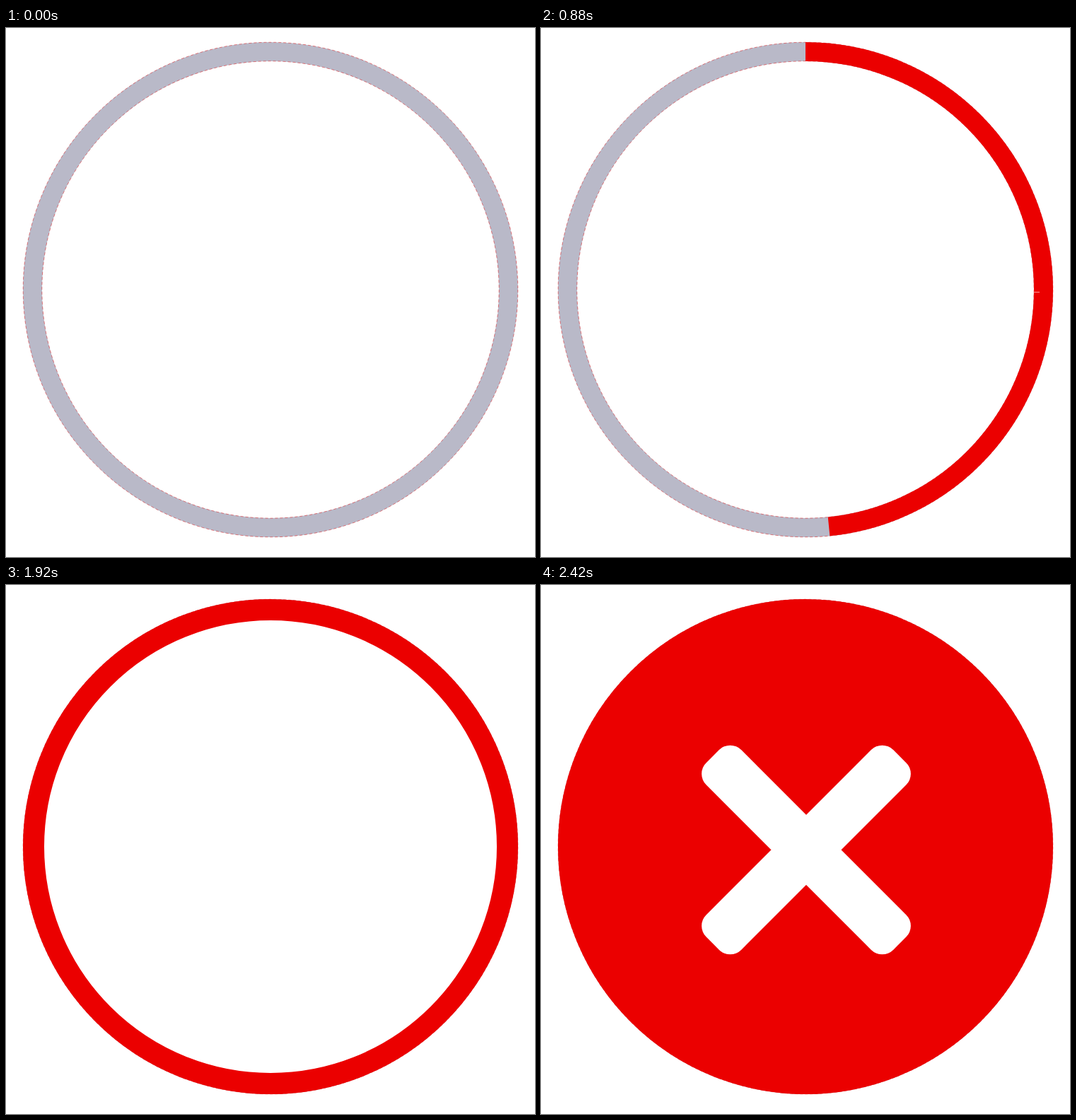
An HTML page for the animation above (2440 ms loop, 748x748 px).

```html
<!DOCTYPE html>
<html lang="en">
<head>
<meta charset="utf-8">
<title>Error ring</title>
<style>
  html, body { margin: 0; width: 100%; height: 100%; overflow: hidden; background: #fff; }
  svg { display: block; width: 100vw; height: 100vh; }
</style>
</head>
<body>
<svg viewBox="0 0 748 748">
  <g fill="none" transform="translate(374 370)">
    <circle r="336.5" stroke="#b9b9c8" stroke-width="27"/>
    <g stroke="#eb0000" stroke-width=".7" stroke-dasharray="4 3" opacity=".65">
      <circle r="349.8"/>
      <circle r="323.2"/>
    </g>
    <circle id="ring" stroke="#eb0000" transform="rotate(-90)"/>
    <path id="seam" d="M323 3.5h8" stroke="#ff9c9c"/>
  </g>
  <g id="cross" fill="#fff">
    <rect x="-187" y="-35" width="374" height="70" rx="22" transform="rotate(45)"/>
    <rect x="-187" y="-35" width="374" height="70" rx="22" transform="rotate(-45)"/>
  </g>
</svg>
<script>
  const LOOP = 2440, STEP = 20;
  const OUTER = 350, INNER = 323;
  const [ring, seam, cross] = ['ring', 'seam', 'cross'].map(id => document.getElementById(id));
  const clamp = (v, lo, hi) => Math.min(hi, Math.max(lo, v));

  function draw(t) {
    // Sweep around the ring, then close the hole, then grow the cross.
    const angle = clamp(Math.min(0.4 * t, 0.186 * (t + 57)), 0, 360);
    const hole = clamp(0.829 * (2306 - t), 0, INNER);
    const grow = clamp((t - 2300) / 120, 0, 1);

    const r = (OUTER + hole) / 2, length = 2 * Math.PI * r;
    ring.setAttribute('r', r);
    ring.setAttribute('stroke-width', OUTER - hole);
    ring.setAttribute('stroke-dasharray',
      angle < 360 ? `${length * angle / 360} ${length}` : 'none');
    ring.style.display = angle > 0 ? '' : 'none';
    seam.style.display = angle > 92 && hole === INNER ? '' : 'none';
    cross.style.display = grow > 0 ? '' : 'none';
    cross.setAttribute('transform', `translate(375 374.5) scale(${grow})`);
  }

  const start = performance.now();
  function tick() {
    const t = (performance.now() - start) % LOOP;
    draw(Math.floor(t / STEP) * STEP);
    requestAnimationFrame(tick);
  }
  draw(0);
  requestAnimationFrame(tick);
</script>
</body>
</html>
```
